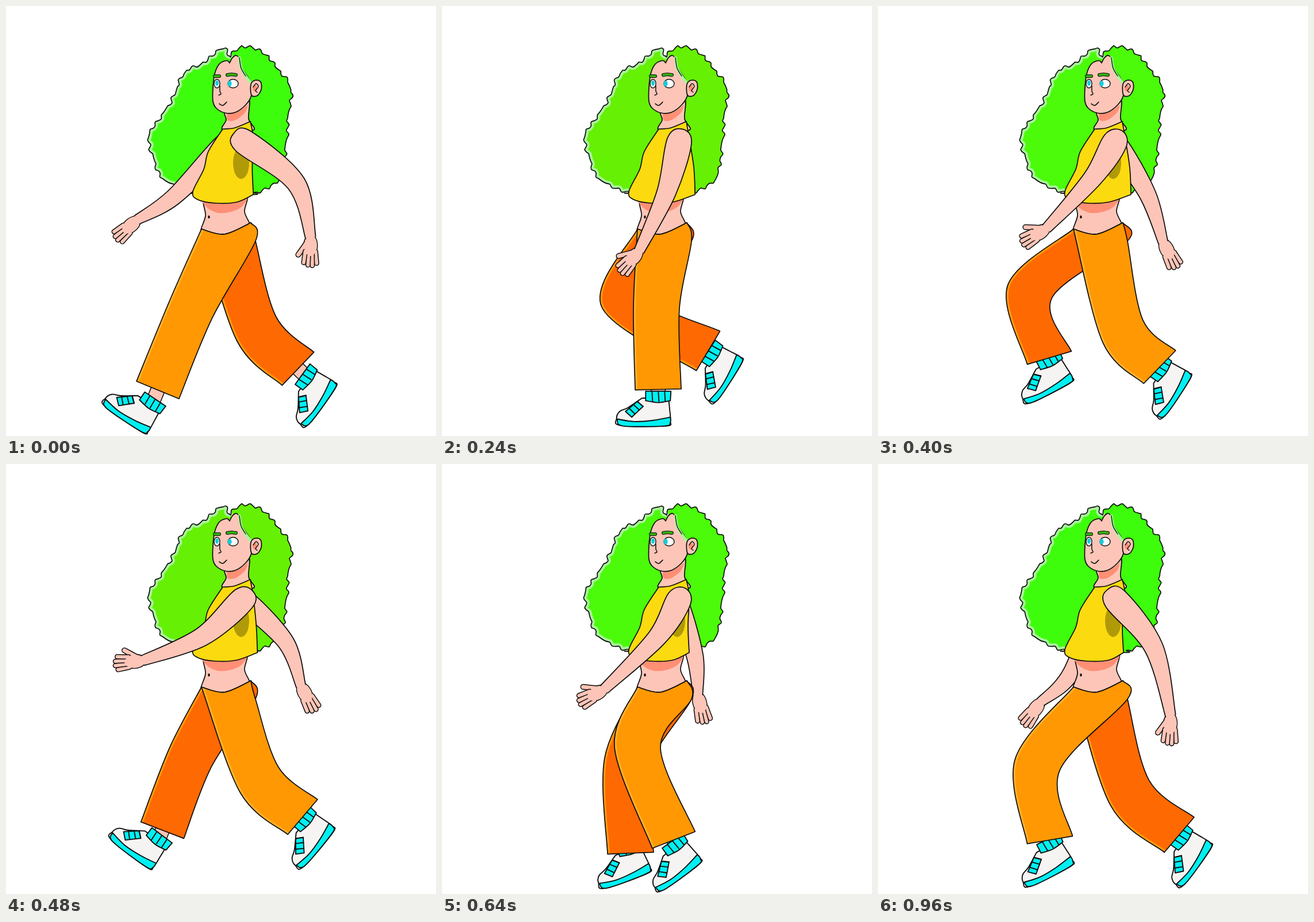
These frames come from a looping animation (748x748 px, 1.04 s). An HTML page with a canvas:

```html
<!DOCTYPE html>
<html lang="en">
<head>
<meta charset="utf-8">
<title>Walk cycle</title>
<style>
html, body { margin: 0; width: 100%; height: 100%; overflow: hidden; background: #fff; }
canvas { display: block; width: 748px; height: 748px; }
</style>
</head>
<body>
<canvas id="stage" width="748" height="748"></canvas>
<script>
const g = document.getElementById('stage').getContext('2d');
const STEP = 80, STEPS = 13;
const INK = '#0b0b0b', SKIN = '#fdc5b7', BLUSH = '#ff8f75', CYAN = '#00f0f2', GLOW = '#a9f59c';
const GREENS = ['#3efd0c', '#66f003', '#4bfb09'];

// Steps of the key poses, and the joints of each limb at those steps.
const keys = [0, 3, 5, 6, 8, 10, 12];
const tint = [0, 1, 2, 1, 2, 2, 0];
const tracks = {
  // knee, ankle, foot angle, bare ankle length
  nearLeg: [
    [322, 527, 264, 668, 34, 26], [373, 525, 376, 667, 0, 13], [426, 566, 490, 628, -56, 5],
    [441, 550, 516, 614, -50, 7], [340, 493, 403, 654, -36, 10], [284, 487, 337, 645, -34, 16],
    [277, 524, 299, 654, -27, 7]],
  farLeg: [
    [436, 562, 508, 631, -54, 22], [316, 512, 463, 600, -57, 10], [264, 497, 298, 612, -27, 5],
    [321, 510, 272, 637, 37, 18], [322, 520, 328, 677, -20, -8], [400, 545, 414, 682, -20, -6],
    [438, 572, 524, 645, -54, 8]],
  // elbow, wrist
  nearArm: [
    [505, 309, 530, 403], [390, 325, 343, 426], [373, 300, 293, 387], [340, 301, 238, 342],
    [374, 302, 282, 392], [414, 335, 372, 440], [480, 320, 509, 438]],
  farArm: [
    [292, 332, 228, 372], [375, 340, 362, 405], [470, 330, 496, 411], [488, 312, 513, 386],
    [440, 335, 445, 402], [410, 335, 385, 405], [335, 365, 283, 414]]
};

const pts = text => text.split(', ').map(p => p.split(' ').map(Number));
const unit = (x, y) => [x / Math.hypot(x, y), y / Math.hypot(x, y)];
const toward = (a, b) => unit(b[0] - a[0], b[1] - a[1]);
const ahead = (p, d, k) => [p[0] + d[0] * k, p[1] + d[1] * k];

function trace(p, corners = [], open = false) {
  const n = p.length;
  const at = i => p[open ? Math.max(0, Math.min(n - 1, i)) : (i + n) % n];
  const sharp = i => corners.includes(i % n);
  g.beginPath();
  g.moveTo(...p[0]);
  for (let i = 0; i < (open ? n - 1 : n); i++) {
    const a = at(i), b = at(i + 1);
    const u = sharp(i) ? a : at(i - 1), v = sharp(i + 1) ? b : at(i + 2);
    g.bezierCurveTo(a[0] + (b[0] - u[0]) / 6, a[1] + (b[1] - u[1]) / 6,
      b[0] - (v[0] - a[0]) / 6, b[1] - (v[1] - a[1]) / 6, ...b);
  }
  if (!open) g.closePath();
}

function ink(width = 1.7, color = INK) {
  g.lineWidth = width;
  g.strokeStyle = color;
  g.stroke();
}

function line(p, width, color) {
  trace(p, [], true);
  ink(width, color);
}

function fill(p, color, corners) {
  trace(p, corners);
  g.fillStyle = color;
  g.fill();
}

// Filled outline with an optional lit edge on its inside.
function shape(p, color, corners, edge, glow, width = 8) {
  fill(p, color, corners);
  if (edge) {
    g.save();
    g.clip();
    line(edge, width, glow);
    g.restore();
    trace(p, corners);
  }
  ink();
}

function oval(x, y, rx, ry, color, outlined) {
  g.beginPath();
  g.ellipse(x, y, rx, ry, 0, 0, 7);
  g.fillStyle = color;
  g.fill();
  if (outlined) ink(1.4);
}

function capsule(a, b, width, color = SKIN) {
  line([a, b], width + 3, INK);
  line([a, b], width, color);
}

function placed(x, y, angle, size, paint) {
  g.save();
  g.translate(x, y);
  g.rotate(angle);
  g.scale(size, size);
  paint();
  g.restore();
}

// Both sides of a two-bone limb, with a width at each joint.
function limb(a, b, c, widths) {
  const d1 = toward(a, b), d2 = toward(b, c);
  const dirs = [d1, unit(d1[0] + d2[0], d1[1] + d2[1]), d2];
  const side = s => [a, b, c].map((p, i) => ahead(p, [-dirs[i][1], dirs[i][0]], s * widths[i] / 2));
  return { front: side(1), back: side(-1), upper: d1, lower: d2 };
}

// Curls: a sine ripple laid along a smooth line through a few points.
function curls(p, amp = 2.6, wave = 17) {
  const out = [];
  let run = 0, last = p[0];
  for (let i = 0; i < p.length - 1; i++) {
    const a = p[i], b = p[i + 1], u = p[i - 1] || a, v = p[i + 2] || b;
    for (let t = 0; t < 1; t += 0.1) {
      const q = [0, 1].map(k => a[k] + t * ((b[k] - u[k]) / 2
        + t * (u[k] - 2.5 * a[k] + 2 * b[k] - v[k] / 2
        + t * (1.5 * (a[k] - b[k]) + (v[k] - u[k]) / 2))));
      run += Math.hypot(q[0] - last[0], q[1] - last[1]);
      const d = run ? toward(last, q) : [0, 0];
      out.push(ahead(q, [d[1], -d[0]], amp * Math.sin(run * 2 * Math.PI / wave)));
      last = q;
    }
  }
  return [...out, p[p.length - 1]];
}

const hairLeft = curls(pts('389 87, 376 74, 340 101, 312 113, 296 143, 281 179, 251 220, 254 262, 276 303, 325 326'));
const hairRight = curls(pts('430 328, 474 302, 488 245, 491 190, 497 142, 474 112, 454 86, 432 74, 408 71, 389 87'));
const hair = hairLeft.concat(hairRight);

function drawHead() {
  shape(pts('360 142, 363 118, 371 101, 384 95, 389 99, 394 90, 401 86, 407 94, 411 109, 426 133, 427 155, 417 172, 399 185, 381 186, 366 178, 360 166'), SKIN, [4]);
  const parting = pts('406 90, 409 108, 417 122, 426 134');
  line(parting, 5, GLOW);
  line(parting.slice(0, 3), 1.3);
  shape(pts('426 136, 434 129, 443 132, 444 145, 437 156, 427 155'), SKIN);
  oval(433, 143, 4, 6, BLUSH);
  line(pts('430 141, 435 135, 439 140, 434 147, 437 150'), 1.4);
  oval(367, 135, 5, 7.5, '#fff', true);
  oval(367, 134, 3, 4.5, '#19cbdc');
  oval(395, 135, 9, 7.5, '#fff', true);
  oval(389, 135, 3.6, 5, '#19cbdc');
  for (const brow of ['363 122, 371 122', '385 120, 392 119, 400 120']) {
    line(pts(brow), 6, INK);
    line(pts(brow), 4, '#35b010');
  }
  line(pts('372 139, 372 148, 374 153, 370 155'), 1.5);
  line(pts('371 170, 377 173, 384 167'), 1.6);
}

function drawShoe() {
  shape(pts('-18 12, -40 27, -53 33, -58 44, -52 55, 20 56, 27 48, 26 30, 24 10'), '#f6f4f2', [0, 8]);
  shape(pts('-57 45, -30 49, 0 47, 27 42, 27 50, 18 56, -48 56'), CYAN, [0, 3]);
  shape(pts('-44 33, -25 17, -16 25, -34 42'), CYAN, [0, 1, 2, 3]);
  for (const k of [0, 7, 13]) line([[-38 + k, 28 - k * 0.8], [-29 + k, 37 - k * 0.9]]);
  shape(pts('-12 1, 28 1, 27 16, 8 19, -12 16'), CYAN, [0, 1, 2, 4]);
  for (const x of [-2, 8, 18]) line([[x, 2], [x + 1, 17]]);
}

function drawLeg([kx, ky, ax, ay, turn, bare], color, glow) {
  const ankle = [ax, ay];
  const { front, back, lower } = limb([383, 390], [kx, ky], ankle, [86, 80, 80]);
  const sock = ahead(ankle, lower, bare);
  capsule(ankle, sock, 23);
  placed(...sock, turn * Math.PI / 180, 1.1, () => {
    g.translate(-8, -10);
    drawShoe();
  });
  const waist = pts('340 388, 380 397, 426 377, 434 409');
  shape([...waist, back[1], back[2], front[2], front[1]], color, [0, 2, 5, 6],
    [front[2], front[1], waist[0]], glow);
}

function drawHand(thumb) {
  oval(14, 0, 20, 12, SKIN, true);
  if (thumb) capsule([8, 6], [30, 21], 7);
  for (let i = 0; i < 4; i++) {
    const y = (i - 1.5) * 6;
    capsule([24, y], [50 - Math.abs(i - 1.4) * 4, y * 1.25], 6);
  }
  oval(14, 0, 18, 11, SKIN);
}

function drawArm(shoulder, [ex, ey, wx, wy], widths, curl, thumb) {
  const { front, back, upper, lower } = limb(shoulder, [ex, ey], [wx, wy], widths);
  placed(wx, wy, Math.atan2(lower[1], lower[0]) + curl, 1, () => drawHand(thumb));
  const cap = ahead(shoulder, upper, -widths[0] / 2);
  const p = [...front.reverse(), cap, ...back];
  trace(p, [], true);
  g.fillStyle = SKIN;
  g.fill();
  ink();
}

function drawBelly() {
  shape(pts('382 180, 383 198, 378 216, 430 216, 422 196, 421 160'), SKIN);
  fill(pts('384 186, 402 185, 421 172, 416 185, 400 198, 386 199'), BLUSH, [0, 2]);
  shape(pts('348 330, 347 365, 339 390, 344 402, 420 398, 424 380, 415 358, 416 325'), SKIN);
  fill(pts('347 335, 415 330, 413 346, 395 357, 370 360, 349 350'), BLUSH);
  oval(353, 367, 1.7, 2.8, INK);
}

function drawShirt(step) {
  const sway = 8 * Math.sin((step - 0.7) / STEPS * 2 * Math.PI);
  const p = pts('377 214, 398 212, 425 201, 430 230, 431 282, 433 328, 402 341, 365 343, 334 337, 325 323, 344 284, 352 253');
  for (const i of [4, 5]) p[i][0] += sway;
  fill(p, '#fcda10', [0, 2, 5]);
  g.save();
  g.clip();
  oval(409, 273, 14, 28, '#b19a08');
  g.restore();
  trace(p, [0, 2, 5]);
  ink();
}

function poseAt(step) {
  const i = keys.findLastIndex(k => k <= step), j = (i + 1) % keys.length;
  const k = (step - keys[i]) / ((keys[j] || STEPS) - keys[i]);
  const pose = { green: GREENS[tint[i]] };
  for (const name in tracks) {
    const [a, b] = [tracks[name][i], tracks[name][j]];
    pose[name] = a.map((n, m) => n + (b[m] - n) * k);
  }
  return pose;
}

function draw(step) {
  const pose = poseAt(step);
  g.fillStyle = '#fff';
  g.fillRect(0, 0, 748, 748);
  g.lineCap = g.lineJoin = 'round';
  shape(hair, pose.green, [], hairLeft, GLOW, 10);
  // The far shoulder is drawn along by its elbow.
  const farX = 402 + (pose.farArm[0] - 402) * 0.2;
  drawArm([farX, 240], pose.farArm, [36, 29, 17], -0.17, false);
  drawBelly();
  drawLeg(pose.farLeg, '#ff6902', '#ff990c');
  drawLeg(pose.nearLeg, '#ff9803', '#ffb02c');
  drawShirt(step);
  drawHead();
  drawArm([413, 235], pose.nearArm, [43, 33, 18], 0.28, true);
}

const start = performance.now();
let last = -1;
function tick() {
  const step = Math.floor((performance.now() - start) / STEP) % STEPS;
  if (step !== last) draw(last = step);
  requestAnimationFrame(tick);
}
tick();
</script>
</body>
</html>
```
